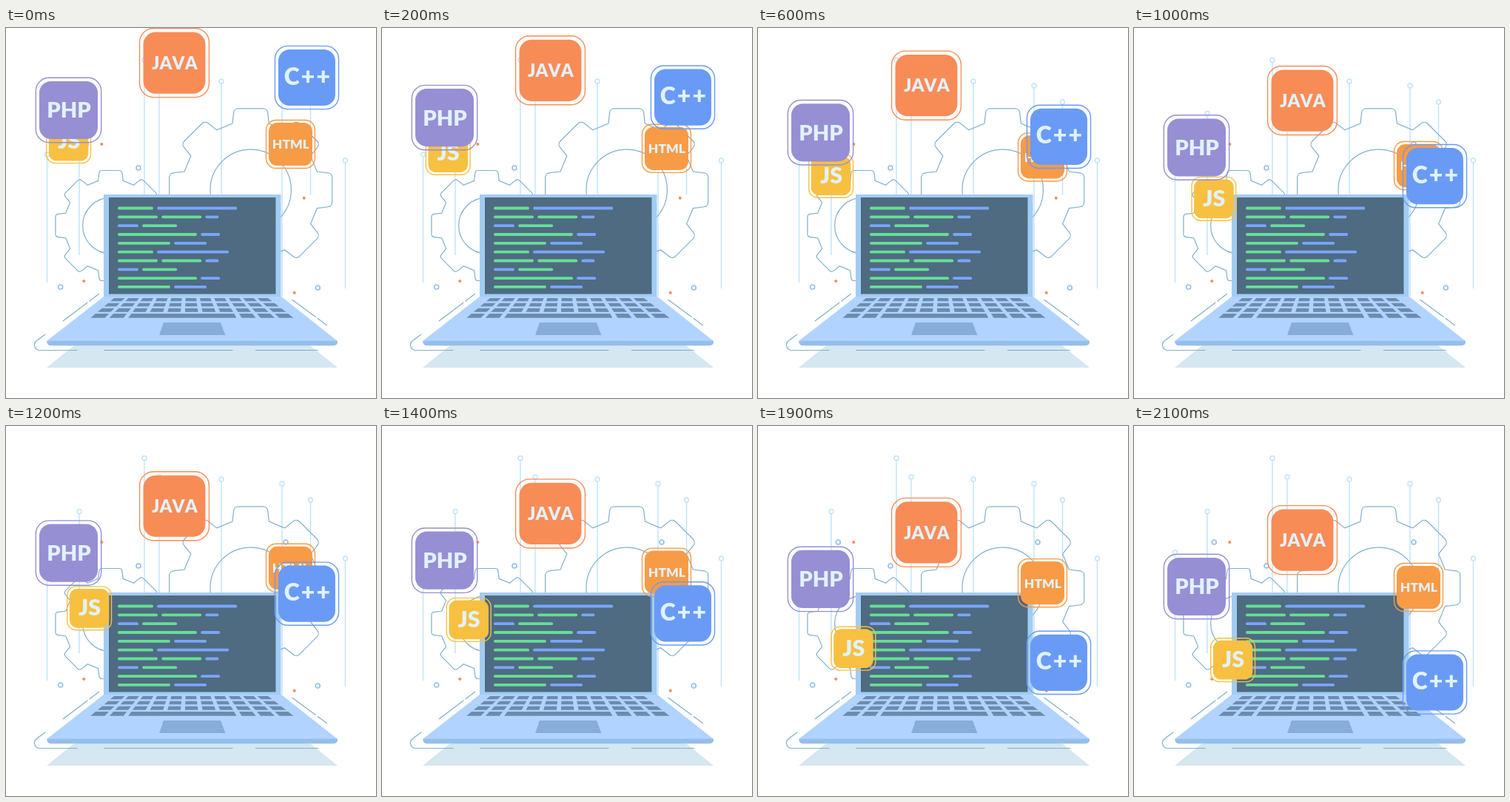
These frames come from a looping animation (500x500 px, 4100 ms). An HTML page with a canvas:

```html
<!DOCTYPE html>
<html lang="en">
<head>
<meta charset="utf-8">
<title>Programming languages</title>
<style>
html, body { margin: 0; width: 100%; height: 100%; overflow: hidden; background: #fff; }
canvas { display: block; width: 500px; height: 500px; }
</style>
</head>
<body>
<canvas id="stage"></canvas>
<script>
const LOOP = 4100, STEP = 100, STEPS = 21;
const canvas = document.getElementById('stage');
const ctx = canvas.getContext('2d');
const ratio = window.devicePixelRatio || 1;
canvas.width = canvas.height = 500 * ratio;

const LINE = '#7fb0cf', CABLE = '#bfe3fc';
const CODE = { g: '#66df95', b: '#7ba5fb' };

// Start centre, width, travel; lift raises the text above the centre
const badges = [
  { text: 'JS', x: 84.6, y: 153.2, w: 53.5, dx: 49, dy: 163, color: '#f8c040', size: 30.5, lift: 1.2 },
  { text: 'PHP', x: 84.5, y: 111, w: 79, dx: 0, dy: 106, color: '#968fd4', size: 29, lift: 0 },
  { text: 'JAVA', x: 227.5, y: 47.1, w: 84, dx: 0, dy: 107, color: '#f88c57', size: 24, lift: 0 },
  { text: 'HTML', x: 384.5, y: 157, w: 59, dx: 0, dy: 61, color: '#f89b46', size: 17.5, lift: 0 },
  { text: 'C++', x: 406.5, y: 67, w: 77, dx: 0, dy: 279.5, color: '#699bf6', size: 32, lift: 2, gap: 2 }
];

// Bars of each code row: colour key and length
const block = ['g54 g54 b18', 'b28 g47', 'g107 b26', 'g71 b44'];
const codeRows = ['g48 b108', ...block, 'g48 b97', ...block];

function poly(points, color) {
  ctx.beginPath();
  points.forEach(p => ctx.lineTo(...p));
  ctx.fillStyle = color;
  ctx.fill();
}

function line(x1, y1, x2, y2, color, width) {
  ctx.beginPath();
  ctx.moveTo(x1, y1);
  ctx.lineTo(x2, y2);
  ctx.strokeStyle = color;
  ctx.lineWidth = width;
  ctx.stroke();
}

function ring(x, y, r, color, width) {
  ctx.beginPath();
  ctx.arc(x, y, r, 0, Math.PI * 2);
  ctx.strokeStyle = color;
  ctx.lineWidth = width;
  ctx.stroke();
}

function dot(x, y) {
  ctx.beginPath();
  ctx.arc(x, y, 2, 0, Math.PI * 2);
  ctx.fillStyle = '#f58a57';
  ctx.fill();
}

function antenna(x, top, bottom = 225) {
  line(x, top + 3, x, bottom, CABLE, 1.4);
  ring(x, top, 3, CABLE, 1.4);
}

// Eight equal teeth around a hole, all sized from the outer radius
function gear(x, y, r, hole) {
  const foot = r * 0.225, tip = r * 0.203, base = r * 0.815, round = r * 0.055;
  ctx.save();
  ctx.translate(x, y);
  ctx.beginPath();
  for (let i = 0; i < 8; i++) {
    const c = Math.cos(i * Math.PI / 4), s = Math.sin(i * Math.PI / 4);
    const turn = (px, py) => [px * c - py * s, px * s + py * c];
    const a = turn(-tip, -r), b = turn(tip, -r), end = turn(foot, -base);
    ctx.lineTo(...turn(-foot, -base));
    ctx.arcTo(...a, ...b, round);
    ctx.arcTo(...b, ...end, round);
    ctx.lineTo(...end);
  }
  ctx.closePath();
  ctx.strokeStyle = LINE;
  ctx.lineWidth = 1.2;
  ctx.stroke();
  ring(0, 0, hole, LINE, 1.2);
  ctx.restore();
}

function backdrop() {
  ctx.fillStyle = '#fff';
  ctx.fillRect(0, 0, 500, 500);
  antenna(55.5, 171, 344);
  antenna(99, 115.5, 307);
  antenna(187, 43.5);
  antenna(207, 69);
  antenna(291, 72);
  antenna(373, 78, 363);
  antenna(411.5, 100);
  antenna(458.5, 179, 352);
  gear(141.4, 267, 74.5, 37.8);
  gear(330.7, 218.8, 110, 54.7);
  [[179, 189], [73.7, 350], [421.3, 351], [378, 157], [108.3, 157]]
    .forEach(([x, y]) => ring(x, y, 3, '#92bfe9', 1.6));
  dot(129.3, 157);
  dot(105.2, 342);
  dot(402.8, 229.7);
  dot(389.7, 357.7);
}

function code() {
  ctx.lineCap = 'round';
  codeRows.forEach((row, i) => {
    const y = 243.5 + i * 11.83;
    let x = 151;
    for (const bar of row.split(' ')) {
      const length = +bar.slice(1);
      line(x + 1.9, y, x + length - 1.9, y, CODE[bar[0]], 3.8);
      x += length + 5.2;
    }
  });
  ctx.lineCap = 'butt';
}

// Keys sit on rows that widen towards the viewer; a and b run from 0 to 1
function key(a, b, top, bottom) {
  const at = (u, y) => {
    const depth = (y - 365) / 27;
    return [146 - 32 * depth + (209 + 67 * depth) * u, y];
  };
  poly([at(a, top), at(b, top), at(b, bottom), at(a, bottom)], '#6c8cae');
}

function keyboard() {
  const pitch = 0.0925, width = 0.069, side = 0.742;
  for (let row = 0; row < 4; row++) {
    const top = 365 + row * 6.5 + row * row * 0.18;
    const bottom = top + 4.2 + row * 0.45;
    const keys = row < 3 ? 8 : 2;
    for (let i = 0; i < keys; i++) key(i * pitch, i * pitch + width, top, bottom);
    for (let i = 0; i < 3; i++) key(side + i * pitch, side + i * pitch + width, top, bottom);
    if (row === 3) key(2 * pitch, 7 * pitch + width, top, bottom);
  }
}

function laptop() {
  poly([[92, 429], [411, 429], [448, 459], [55, 459]], '#d5e7f1');
  ctx.fillStyle = '#a2ccf2';
  ctx.fillRect(132, 225, 239.5, 138.5);
  ctx.fillStyle = '#4e6b82';
  ctx.fillRect(139, 229, 225.5, 130.5);
  code();
  poly([[132, 363], [372, 363], [448, 423], [55, 423]], '#b1d3ff');
  ctx.beginPath();
  ctx.roundRect(55.3, 422.7, 392.7, 6.5, [0, 0, 5, 5]);
  ctx.fillStyle = '#94bfeb';
  ctx.fill();
  keyboard();
  poly([[213, 398], [290, 398], [296.5, 415], [207, 415]], '#87add8');
}

// A line with a single break
function broken(x1, y1, x2, y2, length, gap) {
  ctx.setLineDash([length, gap, 500, 0]);
  line(x1, y1, x2, y2, LINE, 1.2);
  ctx.setLineDash([]);
}

function outlines() {
  broken(126, 359, 77, 396, 17, 2.5);
  broken(386.5, 367, 434, 402, 40, 2.7);
  broken(132, 435.5, 422, 435.5, 174.5, 30.5);
  ctx.beginPath();
  ctx.moveTo(53, 414);
  ctx.lineTo(42, 422);
  ctx.bezierCurveTo(35.5, 427, 38.5, 435.5, 46, 435.5);
  ctx.lineTo(96.5, 435.5);
  ctx.stroke();
}

function badge({ text, x, y, w, dx, dy, color, size, lift, gap = 0 }, progress) {
  x += dx * progress;
  y += dy * progress;
  const box = scale => {
    const bw = w * scale, bh = (w - 0.8) * scale;
    ctx.beginPath();
    ctx.roundRect(x - bw / 2, y - bh / 2, bw, bh, bw * 0.2);
  };
  box(1.118);
  ctx.strokeStyle = color;
  ctx.lineWidth = 1.4;
  ctx.stroke();
  box(1);
  ctx.fillStyle = color;
  ctx.fill();
  ctx.font = `900 ${size}px Lato, sans-serif`;
  ctx.fontKerning = 'none';
  ctx.letterSpacing = gap + 'px';
  ctx.textAlign = 'center';
  ctx.fillStyle = '#e1f2ff';
  ctx.fillText(text, x + 0.4 + gap / 2, y + size * 0.362 - lift);
}

function tick() {
  const step = Math.min(STEPS, Math.floor(performance.now() % LOOP / STEP));
  ctx.setTransform(ratio, 0, 0, ratio, 0, 0);
  backdrop();
  laptop();
  outlines();
  badges.forEach(b => badge(b, step / STEPS));
  requestAnimationFrame(tick);
}
tick();
</script>
</body>
</html>
```
